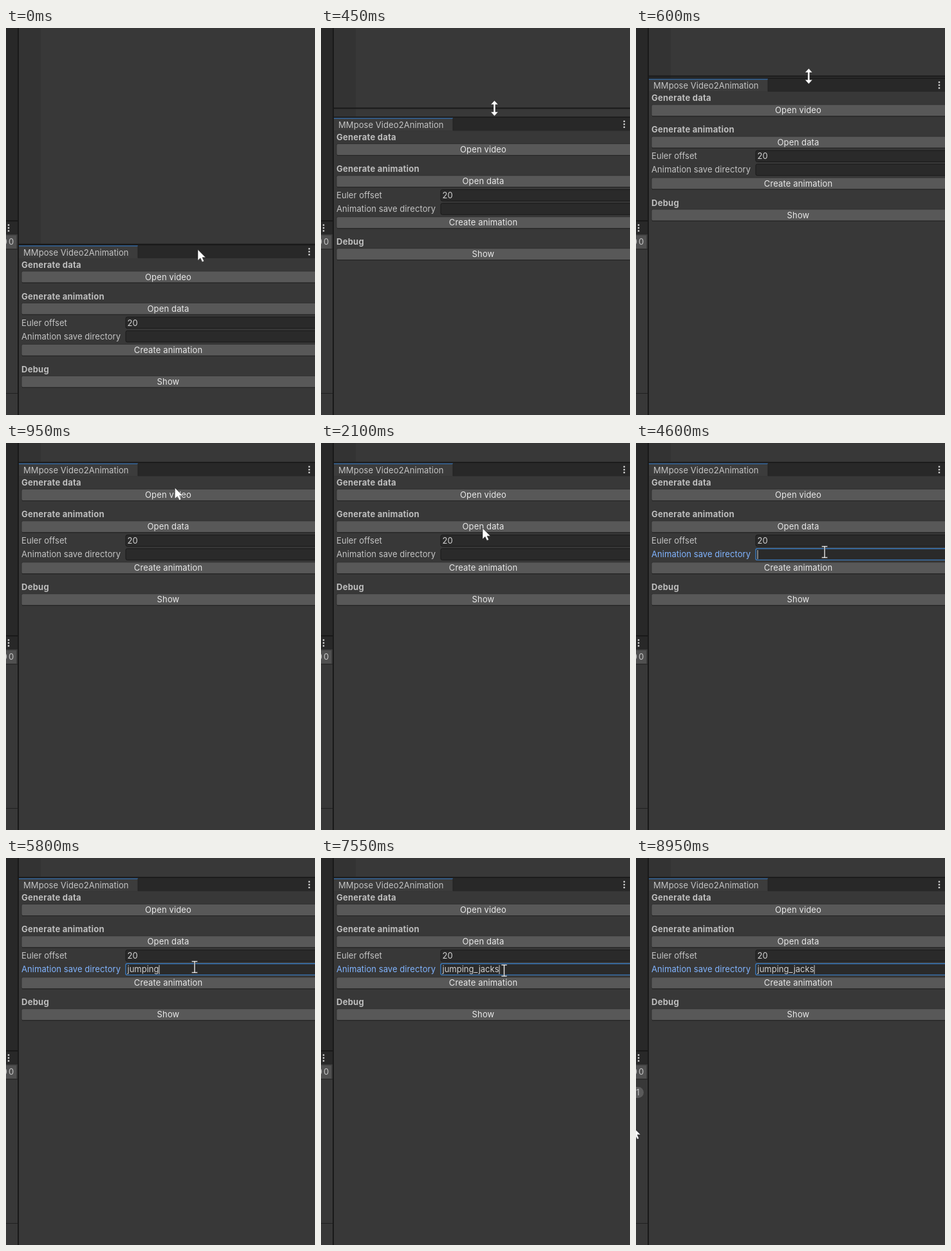
An HTML page that plays this animation: 480x600 px, repeating every 9 s.

```html
<!DOCTYPE html>
<html lang="en">
<head>
<meta charset="utf-8">
<title>Editor panel</title>
<style>
  html, body { margin: 0; width: 100%; height: 100%; overflow: hidden; background: #383838; }
  svg { display: block; width: 480px; height: 600px; }
  text { font: 13px Inter, sans-serif; letter-spacing: .07px; fill: #c4c4c4; white-space: pre; }
  .bold { font-weight: 700; letter-spacing: .25px; fill: #bebebe; }
  .btn { fill: #585858; stroke: #303030; }
  .btn.down { fill: #46607c; }
  .cap { fill: #e8e8e8; letter-spacing: .14px; text-anchor: middle; }
  .field { fill: #2a2a2a; stroke: #1a1a1a; }
  .val { fill: #d2d2d2; letter-spacing: 0; }
  .focus .field { stroke: #3a79bb; stroke-width: 1.4; }
  .focus .name { fill: #81b4ff; }
  .cursor path { fill: #fff; stroke: #222; stroke-width: .5; }
</style>
</head>
<body>
<svg id="stage" viewBox="0 0 480 600"></svg>
<script>
const LOOP = 9000, STEP = 50;
const stage = document.getElementById('stage');

function add(parent, tag, attrs = {}, text) {
  const el = document.createElementNS('http://www.w3.org/2000/svg', tag);
  for (const k in attrs) el.setAttribute(k, attrs[k]);
  if (text !== undefined) el.textContent = text;
  return parent.appendChild(el);
}
const box = (p, x, y, width, height, fill) => add(p, 'rect', { x, y, width, height, fill });
const label = (p, x, mid, text, cls = '') => add(p, 'text', { x, y: mid + 4.6, class: cls }, text);

function dots(p, x, mid) {
  for (const d of [-4.5, 0, 4.5]) box(p, x - 1.2, mid + d - 1.2, 2.4, 2.4, '#d0d0d0');
}
function button(p, mid, text) {
  const r = add(p, 'rect', { x: 24, y: mid - 9, width: 470, height: 18, rx: 2.5, class: 'btn' });
  box(p, 25, mid + 8.6, 460, 1, '#242424');
  label(p, 252, mid, text, 'cap');
  return r;
}
function field(p, mid, name, value) {
  const g = add(p, 'g');
  label(g, 24, mid, name, 'name');
  add(g, 'rect', { x: 186, y: mid - 8.8, width: 310, height: 17.6, rx: 2.5, class: 'field' });
  return { g, val: label(g, 188.5, mid, value, 'val') };
}

// Scene view behind the panel
box(stage, 20, 0, 460, 600, '#383838');
box(stage, 20, 0, 34, 600, '#333');
const split = box(stage, 20, 29, 460, 2, '#191919');

// Sliding panel, laid out at its final position
const panel = add(stage, 'g');
box(panel, 20, 29.5, 460, 900, '#383838');
box(panel, 20, 29.5, 460, 2, '#191919');
box(panel, 20, 31.5, 460, 20, '#282828');
box(panel, 20, 31.5, 185, 20, '#3c3c3c');
box(panel, 20, 31.5, 185, 1.5, '#33649a');
box(panel, 204.5, 32, 1, 19, '#232323');
label(panel, 27, 42.5, 'MMpose Video2Animation');
dots(panel, 471, 41.3);
label(panel, 24, 61.6, 'Generate data', 'bold');
button(panel, 80.5, 'Open video');
label(panel, 24, 110.6, 'Generate animation', 'bold');
const openData = button(panel, 129.8, 'Open data');
field(panel, 151.4, 'Euler offset', '20');
const dir = field(panel, 172.6, 'Animation save directory', '');
const caret = box(panel, 0, 166, 1, 14, '#d2d2d2');
const create = button(panel, 193.8, 'Create animation');
label(panel, 24, 223.7, 'Debug', 'bold');
button(panel, 242.8, 'Show');

// Left column
box(stage, 0, 0, 18, 299, '#282828');
box(stage, 0, 298, 18, 2, '#191919');
box(stage, 0, 300, 18, 20, '#282828');
box(stage, 0, 320, 18, 23, '#3c3c3c');
box(stage, 0, 321.5, 16, 20.5, '#505050');
box(stage, 0, 343, 18, 257, '#383838');
box(stage, 0, 342.5, 18, 1, '#232323');
box(stage, 0, 566, 18, 1, '#202020');
box(stage, 18, 0, 2, 600, '#191919');
dots(stage, 4, 310);
label(stage, -6.3, 331.8, '0');
label(stage, 4, 331.8, '0');
const badge = add(stage, 'g');
add(badge, 'rect', { x: -12, y: 355, width: 24, height: 17, rx: 8.5, fill: '#5a5a5a' });
label(badge, 0.3, 363.7, '1');

// Pointer shapes
const cursor = add(stage, 'g', { class: 'cursor' });
const shapes = {
  arrow: 'M0 0V17L3.9 13.3L6.8 19.2L9.6 17.9L7 12.2H12.1Z',
  resize: 'M0-12L5.8-5.6H1.5V5.6H5.8L0 12L-5.8 5.6H-1.5V-5.6H-5.8Z',
  beam: 'M-4.5-9.5H4.5V-7.8H.9V7.8H4.5V9.5H-4.5V7.8H-.9V-7.8H-4.5Z'
};
for (const k in shapes) shapes[k] = add(cursor, 'path', { d: shapes[k] });

const clamp = (v, lo, hi) => Math.min(hi, Math.max(lo, v));
const within = (t, a, b) => t >= a && t < b;
const show = (el, on) => el.setAttribute('visibility', on ? 'visible' : 'hidden');

// The panel rushes up and settles; the splitter runs ahead of it with speed
const FAR = 305.5;
const panelY = t => t < 300 ? FAR : clamp(319.5 * Math.exp((240 - t) / 218) - 14, 0, FAR);
const splitY = t => t < 300 ? FAR : panelY(t) - panelY(t) ** 2 / 860;

// Pointer glides: [from, to, x, y]
const glides = [
  [0, 100, 270, 337], [300, 850, 267, 34], [850, 1075, 256, 119], [1250, 2000, 251, 132],
  [3500, 3650, 252, 227], [3700, 4200, 293, 169], [7300, 8000, 264, 188], [8250, 8950, -5, 416.8]
];
function pointer(t) {
  let x = 298, y = 343.5;
  for (const [from, to, tx, ty] of glides) {
    const u = clamp((t - from) / (to - from), 0, 1), e = u * u * (3 - 2 * u);
    x += (tx - x) * e;
    y += (ty - y) * e;
  }
  return [x, within(t, 100, 850) ? 30 + splitY(t) : y];
}
function pointerKind(t) {
  if (within(t, 100, 850)) return 'resize';
  return within(t, 4150, 7600) ? 'beam' : 'arrow';
}
const typed = t => 'jumping_jacks'.slice(0, Math.max(0, Math.floor((t - 4700) / 180) + 1));

function draw(now) {
  const t = Math.floor(now % LOOP / STEP) * STEP;
  panel.setAttribute('transform', `translate(0 ${panelY(t)})`);
  split.setAttribute('y', 29 + splitY(t));

  cursor.setAttribute('transform', `translate(${pointer(t)})`);
  const kind = pointerKind(t);
  for (const k in shapes) show(shapes[k], k === kind);

  openData.classList.toggle('down', within(t, 1800, 1950));
  create.classList.toggle('down', within(t, 8150, 8300));

  const focus = t >= 4300, text = typed(t);
  dir.g.setAttribute('class', focus ? 'focus' : '');
  if (dir.val.textContent !== text) dir.val.textContent = text;
  caret.setAttribute('x', 188.5 + (text ? dir.val.getComputedTextLength() : 0));
  show(caret, focus);
  show(badge, t >= 8350);
}

const start = performance.now();
function tick() {
  draw(performance.now() - start);
  requestAnimationFrame(tick);
}
tick();
</script>
</body>
</html>
```
